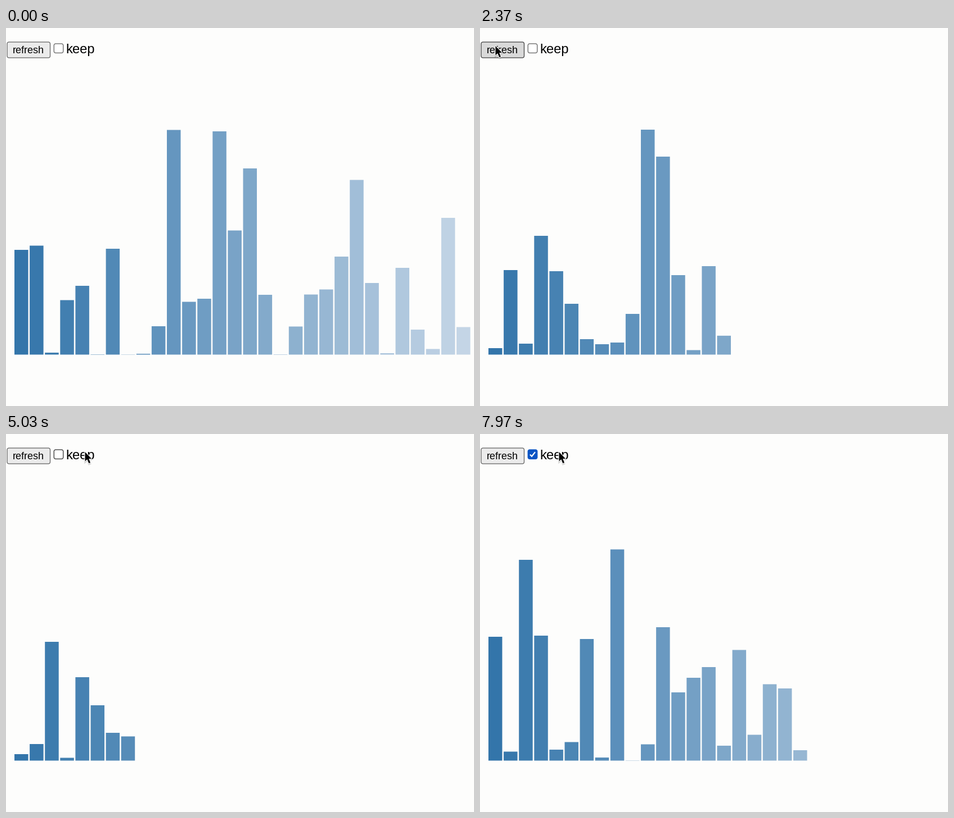
These frames come from a looping animation (832 px wide and 673 px high, 8 s). A matplotlib script:

```python
import numpy as np
import matplotlib.pyplot as plt
from matplotlib.animation import FuncAnimation
from matplotlib.patches import FancyBboxPatch, Polygon, Rectangle

W, H, DPI = 832, 673, 64
PX = 72 / DPI                    # points per pixel
LOOP, STEP = 8000, 20
TICK = 100 / 3                   # the picture advances at 30 fps
BASE, PITCH, BAR_W, COUNT = 581.5, 27.1, 24.5, 30
BAR_MS = 100.7                   # time one bar takes to grow

# bar heights of each run, with the time its sweep begins
FIRST = [186.5, 194, 3.5, 97, 122.5, .5, 188.5, .3, 1.5, 50.5,
         400, 94, 99.5, 397.5, 221, 331.5, 106.5, .5, 50, 107,
         116, 174.5, 311, 127.5, 2.5, 154.5, 44.5, 10, 243.5, 49]
SECOND = [11.5, 150.5, 19.5, 211.5, 148.5, 90.5, 27.5, 18.5, 21.5, 72.5,
          400.5, 352.5, 141.5, 8, 157.5, 54.5, 215.5, 74.5, 2.5, 45,
          377.5, 266.5, 165, 347, 60, 120, 12, 210, 35, 90]
THIRD = [11.5, 29.5, 211.5, 5, 148.5, 98.5, 49.5, 126, 289, 6.5,
         8.5, 1.5, 11.5, 195, 81.5, 69, 197, 46, 136, 128.5, 27]
FOURTH = [220.5, 16, 357.5, 222.5, 19.5, 33, 216.5, 5.5, 376, .3,
          29, 237.5, 121.5, 147.5, 166.5, 15]
CLEAR_1, CLEAR_2, KEEP = 794, 4294, 6377

# cursor stops: time, x, y
PATH = [(60, -18, 10), (600, 27.5, 32), (4400, 27.5, 32), (4850, 140.5, 32)]


def sweep(start, goal, t, begin):
    """Move bars one after another from start to goal."""
    goal = np.pad(goal, (0, COUNT - len(goal)))
    part = np.clip((t - begin) / BAR_MS - np.arange(COUNT), 0, 1)
    return start + (goal - start) * part


def heights(t):
    empty = np.zeros(COUNT)
    if t < CLEAR_1:
        return np.array(FIRST)
    if t < CLEAR_2:
        return sweep(empty, SECOND, t, CLEAR_1)
    grown = sweep(empty, THIRD, min(t, KEEP), CLEAR_2)
    return grown if t < KEEP else sweep(grown, FOURTH, t, KEEP)


def cursor_at(t):
    if t <= PATH[0][0]:
        return PATH[0][1:]
    for (t0, x0, y0), (t1, x1, y1) in zip(PATH, PATH[1:]):
        if t < t1:
            u = (t - t0) / (t1 - t0)
            u = u * u * (3 - 2 * u)
            return x0 + (x1 - x0) * u, y0 + (y1 - y0) * u
    return PATH[-1][1:]


def rounded(x, y, w, h, r, **style):
    box = FancyBboxPatch((x, y), w, h, mutation_aspect=1,
                         boxstyle=f"round,pad=0,rounding_size={r}", **style)
    return ax.add_patch(box)


def label(x, y, text, size):
    ax.text(x, y, text, fontsize=size * PX, family="Liberation Sans",
            color="black", va="baseline", zorder=3)


fig = plt.figure(figsize=(W / DPI, H / DPI), dpi=DPI, facecolor="#fdfdfc")
ax = fig.add_axes([0, 0, 1, 1])
ax.set_xlim(0, W)
ax.set_ylim(H, 0)
ax.axis("off")

dark, light = np.array([51, 117, 170]) / 255, np.array([196, 213, 230]) / 255
bars = []
for i in range(COUNT):
    tone = dark + (light - dark) * i / (COUNT - 1)
    bar = Rectangle((15 + PITCH * i, BASE), BAR_W, 0, fc=tone, lw=0, snap=False)
    bars.append(ax.add_patch(bar))

button = rounded(2, 25, 76.5, 28, 3.5, lw=1.3 * PX)
check = rounded(85.3, 28, 16.4, 16.4, 3, lw=1.4 * PX)
tick, = ax.plot([89, 92, 98], [36.6, 39.8, 32.2], color="white",
                lw=2.2 * PX, solid_capstyle="butt", solid_joinstyle="miter")
label(12, 45, "refresh", 18)
label(106.3, 45, "keep", 23.8)

ARROW = np.array([(0, 0), (0, 16.6), (3.8, 13.1), (6.8, 20.2), (9.6, 19),
                  (6.7, 12.1), (11.6, 12)])
shadow = ax.add_patch(Polygon(ARROW, fc="black", ec="black", alpha=.14,
                              lw=2.5 * PX, zorder=4))
rim = ax.add_patch(Polygon(ARROW, fc="white", ec="white", lw=2.4 * PX, zorder=5))
arrow = ax.add_patch(Polygon(ARROW, fc="black", lw=0, zorder=6))


def draw(n):
    t = round(n * STEP / TICK) * TICK
    for bar, h in zip(bars, heights(t)):
        bar.set_y(BASE - h)
        bar.set_height(h)

    x, y = cursor_at(t)
    for part, drop in ((shadow, 2), (rim, 0), (arrow, 0)):
        part.set_xy(ARROW + (x, y + drop))

    on_button = 2 <= x <= 78 and 25 <= y <= 53
    on_label = 85 <= x <= 158
    button.set_facecolor("#d9d9d9" if on_button else "#ebebeb")
    button.set_edgecolor("#444444" if on_button else "#666666")

    kept = t >= KEEP
    check.set_facecolor("#0a54c4" if kept else "white")
    check.set_edgecolor("#0a54c4" if kept else "#444444" if on_label else "#707070")
    tick.set_visible(kept)
    return bars + [button, check, tick, shadow, rim, arrow]


anim = FuncAnimation(fig, draw, frames=LOOP // STEP, interval=STEP,
                     repeat=True, repeat_delay=0, blit=False)
plt.show()
```
